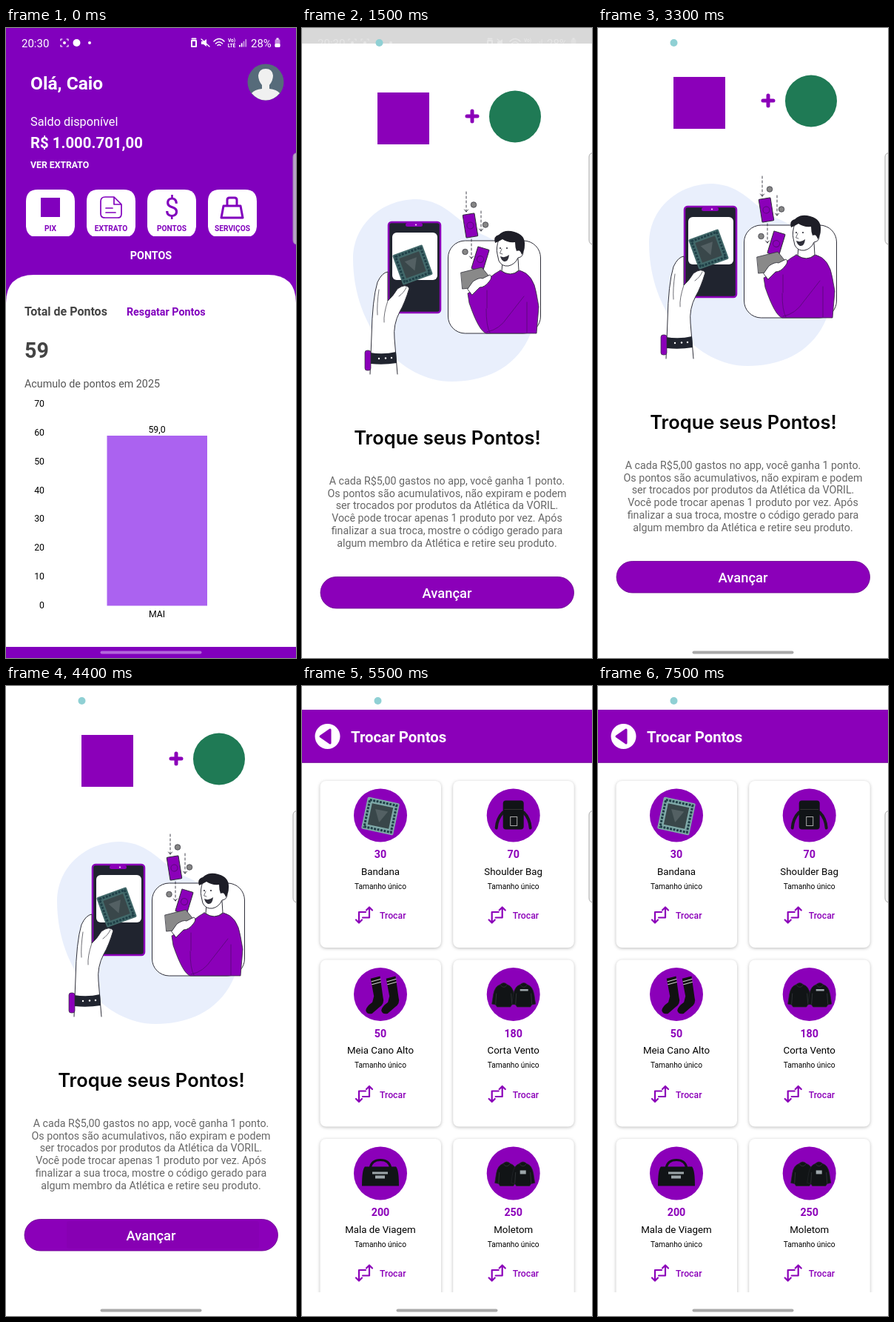
Animation, 392 px wide and 850 px high, one loop 8000 ms. Source, as an HTML page:

```html
<!DOCTYPE html>
<html lang="pt-BR">
<head>
<meta charset="utf-8">
<title>Pontos</title>
<style>
  html, body { margin: 0; width: 100%; height: 100%; overflow: hidden; background: #fff; }
  svg { display: block; width: 100%; height: 100%; }
  text { font-family: Roboto, sans-serif; }
  .card { filter: drop-shadow(0 1.5px 2px #0004); }
</style>
</head>
<body>
<svg id="stage" viewBox="0 0 392 850" xmlns="http://www.w3.org/2000/svg"></svg>
<script>
const LOOP = 8000;
const HOME = '#8100bd', PURPLE = '#8b00b9', INK = '#30303a';

const text = (x, y, size, str, { weight = 400, fill = '#000', anchor = 'start', font = '' } = {}) =>
  `<text x="${x}" y="${y}" font-size="${size}" font-weight="${weight}" fill="${fill}" text-anchor="${anchor}"${
    font ? ` style="font-family:${font}"` : ''}>${str}</text>`;
const rect = (x, y, w, h, r, fill, extra = '') =>
  `<rect x="${x}" y="${y}" width="${w}" height="${h}" rx="${r}" fill="${fill}" ${extra}/>`;
const circle = (x, y, r, fill, extra = '') => `<circle cx="${x}" cy="${y}" r="${r}" fill="${fill}" ${extra}/>`;
const path = (d, fill = 'none', stroke = 'none', width = 1, extra = '') =>
  `<path d="${d}" fill="${fill}" stroke="${stroke}" stroke-width="${width}" stroke-linecap="round" stroke-linejoin="round" ${extra}/>`;
const group = (id, body, extra = '') => `<g id="${id}" ${extra}>${body}</g>`;
const at = (x, y, body, turn = 0) => `<g transform="translate(${x} ${y}) rotate(${turn})">${body}</g>`;

function home() {
  const white = { fill: '#fff', weight: 700 };
  const dark = { fill: '#444', weight: 700 };
  const icons = [
    rect(47, 229, 26, 26, 0, HOME),
    path('M134 228H146L156 238V251Q156 256 151 256H134Q128 256 128 251V234Q128 228 134 228M146 229V238H155M135 243H144M135 249H148', 'none', HOME, 1.7),
    text(224, 254, 35, '$', { fill: HOME, anchor: 'middle' }),
    path('M299 239V232Q299 229 302 229H309Q312 229 312 232V239M294 240H317L320 256H291Z', 'none', HOME, 3),
  ];
  const tiles = ['PIX', 'EXTRATO', 'PONTOS', 'SERVIÇOS'].map((label, i) => {
    const x = 27 + 82 * i;
    return path(`M${x} 234Q${x} 218 ${x + 16} 218H${x + 50}Q${x + 66} 218 ${x + 66} 234V268Q${x + 65} 278 ${x + 58} 281H${x + 8}Q${x + 1} 278 ${x} 268Z`, '#fff')
      + icons[i] + text(x + 33, 273.5, 10.2, label, { weight: 700, fill: HOME, anchor: 'middle' });
  }).join('');
  const axis = Array.from({ length: 8 }, (_, i) =>
    text(52, 783 - i * 38.85, 12.25, i * 10, { anchor: 'end' })).join('');
  return rect(0, 0, 392, 850, 0, HOME)
    + text(33, 83, 24.5, 'Olá, Caio', white)
    + circle(351, 73, 24.5, '#566b7a')
    + path('M332 88Q336 83 346 82V77Q341 71 341 64Q342 55 351 55Q360 55 361 64Q361 71 356 77V82Q366 83 370 88Q362 97.5 351 97.5Q340 97.5 332 88Z', '#f0f0f0')
    + text(33, 132, 16.3, 'Saldo disponível', { fill: '#fff' })
    + text(33, 162, 20.4, 'R$ 1.000.701,00', white)
    + text(33, 189, 12.25, 'VER EXTRATO', white)
    + tiles
    + text(196, 312, 14.3, 'PONTOS', { ...white, anchor: 'middle' })
    + path('M0 835V371Q0 333 38 333H354Q392 333 392 371V835Z', '#fff')
    + text(25, 388, 16, 'Total de Pontos', dark)
    + text(163, 388, 14.3, 'Resgatar Pontos', { weight: 700, fill: HOME })
    + text(25, 445, 28.6, '59', dark)
    + text(25, 485, 14.3, 'Acumulo de pontos em 2025', { fill: '#555' })
    + axis
    + rect(136.5, 550, 135.5, 229.5, 0, '#ab62f0')
    + text(204, 546, 12.25, '59,0', { anchor: 'middle' })
    + text(204, 795, 12.25, 'MAI', { anchor: 'middle' });
}

const bandana = (size, hem) =>
  rect(-size / 2, -size / 2, size, size, 2, hem)
  + rect(-size * .42, -size * .42, size * .84, size * .84, 0, 'none', `stroke="#1f3f47" stroke-width="${size * .07}" stroke-dasharray="3 1.5"`)
  + rect(-size * .33, -size * .33, size * .66, size * .66, 0, '#39474a')
  + path(`M${-size * .2} ${-size * .18}H${size * .2}L0 ${size * .2}Z`, '#536063');

function illustration() {
  const bill = (x, y, turn) => at(x, y, rect(-8, -15.5, 16, 31, 1, PURPLE, `stroke="${INK}"`)
    + circle(0, 0, 4.5, 'none', 'stroke="#5c087c"'), turn);
  const arrow = (x, y, length) => path(`M${x} ${y}v${length}`, 'none', INK, .9, 'stroke-dasharray="3 3"')
    + path(`M${x - 2.5} ${y + length - 3}l2.5 3l2.5 -3`, 'none', INK, .9);
  const coin = (x, y) => circle(x, y, 3.8, '#858585', `stroke="${INK}" stroke-width=".7"`);
  return path('M69 290C69 245 107 210 155 210C195 212 209 240 240 256C280 273 316 300 317 345C318 405 280 456 202 456C135 456 69 385 69 290Z', '#e9effc')
    // phone and hand
    + rect(117, 241, 70, 122, 4, '#20242f', `stroke="${PURPLE}" stroke-width="2.5"`)
    + rect(140, 242, 23, 5, 2.5, PURPLE) + circle(154, 244.5, 1, '#fff')
    + rect(122, 255, 61, 64, 6, '#fff')
    + at(149.5, 298.5, bandana(43, '#42696a'), -20)
    + path('M92 446L94 395Q95 345 102 322Q108 309 116 308V347Q123 341 129 331Q140 323 145 330Q139 350 132 362Q123 379 125 398L129 446', '#fff', INK, 1)
    + path('M116 347Q110 365 111 376M131 341Q138 336 141 329M104 332Q101 352 102 366', 'none', INK, .7)
    + path('M92 417Q110 420 127 416L128 431Q110 434 93 432Z', '#20242f')
    + circle(104, 425, 1.2, '#fff') + circle(113, 424.5, 1.2, '#fff') + circle(121, 424, 1.2, '#fff')
    + rect(85, 414, 8, 27, 3, PURPLE, `stroke="${INK}" stroke-width=".7"`)
    // man with wallet
    + rect(197.5, 266, 125, 125, 23, '#fff', `stroke="${INK}"`)
    + path('M271 294L270 307Q282 316 293 306L292 290Z', '#fff', INK)
    + path('M266 264Q262 276 264 284L266 293Q270 301 279 300Q288 298 292 289Q299 288 299 281Q297 276 292 279V263Z', '#fff', INK)
    + path('M261 269Q258 260 266 258Q274 250 287 254Q302 258 301 272Q301 280 297 285Q295 277 290 280Q288 275 288 268Q278 269 271 264Q266 267 261 269Z', '#1e1e27')
    + circle(268, 276, 1.1, INK) + circle(277, 276, 1.1, INK) + path('M270 277L267.5 283L271 284', 'none', INK, .7)
    + path('M268 287Q274 290 280 285Q279 295 273 294Q269 292 268 287Z', INK)
    + path('M268 306Q282 316 294 306Q313 311 317 338L320 355L317 391H249Q239 388 226 350L224 337L244 327Q253 314 268 306Z', PURPLE, INK, .8)
    + path('M250 333V357M250 389Q267 386 278 369L300 341M249 358Q249 382 254 390M304 349V390', 'none', '#5c087c', .9)
    + bill(241, 291, 17)
    + path('M215 309L243 302L252 313L245 328L217 331Z', '#898989', INK, .8)
    + path('M224 331L231 321Q240 315 244 317L254 312Q258 315 253 321Q247 329 240 329L230 339Z', '#fff', INK, .9)
    + bill(227.5, 245.5, -9)
    + arrow(222, 200, 27) + arrow(242, 226, 27) + arrow(229, 264, 26)
    + coin(232, 217.5) + coin(248, 244.5) + coin(220.5, 281);
}

function intro() {
  const lines = [
    'A cada R$5,00 gastos no app, você ganha 1 ponto.',
    'Os pontos são acumulativos, não expiram e podem',
    'ser trocados por produtos da Atlética da VORIL.',
    'Você pode trocar apenas 1 produto por vez. Após',
    'finalizar a sua troca, mostre o código gerado para',
    'algum membro da Atlética e retire seu produto.',
  ];
  return rect(0, 0, 392, 850, 0, '#fff')
    + rect(102, 66, 70, 70, 0, PURPLE)
    + path('M223 98H237M230 91V105', 'none', PURPLE, 5)
    + circle(288, 98.5, 35, '#1f7a55')
    + illustration()
    + text(196.5, 540.5, 25.5, 'Troque seus Pontos!', { weight: 600, anchor: 'middle', font: 'Inter, sans-serif' })
    + lines.map((line, i) => text(196, 595 + i * 16.7, 14.24, line, { fill: '#666', anchor: 'middle' })).join('')
    + rect(25, 719.5, 342.5, 42.5, 21.25, PURPLE, 'stroke="#69008e" stroke-width=".8"')
    + rect(82, 722, 260, 37, 3, '#000', 'id="press" opacity="0"')
    + text(196, 748, 18.4, 'Avançar', { weight: 500, fill: '#fff', anchor: 'middle' });
}

const jacket = x => at(x, 0,
  path('M-5 -13Q0 -18 5 -13Q12 -11 14 0L16 13L11 14L9 17H-9L-11 14L-16 13L-14 0Q-12 -11 -5 -13Z', '#111416', '#25292c', .7)
  + path('M-4 -12Q0 -7 4 -12M-10 -1L-11 13M10 -1L11 13', 'none', '#34393c', .8));
const label = (x, y, w, h) => rect(x, y, w, h, 0, '#9da6aa');
const sock = x => at(x, 0,
  path('M-7 -22L6 -24L7 4Q9 14 0 18L-10 25Q-17 26 -18 20Q-17 15 -8 10L-5 2Z', '#111')
  + path('M-6 -18L6 -20M-6 -14L6 -16', 'none', '#ccc', 1.2), -6);

const products = [
  [30, 'Bandana', at(0, 1, bandana(44, '#7fa9a8'), 12)],
  [70, 'Shoulder Bag', path('M-14 -4Q-22 4 -23 17M14 -4Q22 4 23 17', 'none', '#17191c', 4)
    + rect(-14, -20, 28, 39, 4, '#111417') + path('M-12 -8H12', 'none', '#333', 1) + rect(-4, 2, 9, 12, 0, 'none', 'stroke="#aaa"')],
  [50, 'Meia Cano Alto', sock(-4) + sock(17)],
  [180, 'Corta Vento', jacket(-13) + jacket(14) + label(9, -7, 11, 2.5)],
  [200, 'Mala de Viagem', path('M-14 -7Q-12 -18 0 -18Q12 -18 14 -7', 'none', '#111417', 3)
    + path('M-21 -9H21Q25 -5 25 17H-25Q-25 -5 -21 -9Z', '#111417') + label(-11, -2, 21, 3) + label(-7, 3, 13, 4)],
  [250, 'Moletom', jacket(-9) + jacket(13) + label(9, -4, 8, 5)],
];

function card([points, name, picture], i) {
  const opts = { anchor: 'middle' };
  return at(24.5 + (i % 2) * 179.7, 128 + Math.floor(i / 2) * 241.5,
    rect(0, 0, 163.5, 225, 8, '#fff', 'class="card"')
    + `<g class="picture">${circle(81.5, 46.5, 36, PURPLE)}${at(81.5, 46.5, picture)}</g>`
    + text(81.5, 104, 14.3, points, { ...opts, weight: 700, fill: PURPLE })
    + text(81.5, 126.5, 13.3, name, opts)
    + text(81.5, 145.5, 10.2, 'Tamanho único', opts)
    + path('M61.5 177H52.5V191M48.5 187.5L52.5 191.5L56.5 187.5M57.5 184.5H66.5V171M62.5 174.5L66.5 170.5L70.5 174.5', 'none', PURPLE, 2.2)
    + text(80.5, 186, 12.25, 'Trocar', { weight: 500, fill: PURPLE }));
}

function shop() {
  return rect(0, 0, 392, 850, 0, '#fff')
    + rect(0, 32, 392, 71.5, 0, PURPLE) + rect(0, 102.8, 392, .8, 0, '#69008e')
    + circle(34.5, 68, 17, '#fff') + path('M25 68L38 59V77Z', PURPLE, PURPLE, 3)
    + text(66, 76, 20.4, 'Trocar Pontos', { weight: 700, fill: '#fff' })
    + group('cards', products.map(card).join(''), 'clip-path="url(#list)"');
}

function statusBar() {
  const scan = (id, x) => group(id, path(`M${x - 5} 17v-2h2M${x + 3} 15h2v2M${x + 5} 23v2h-2M${x - 3} 25h-2v-2`, 'none', '#fff', 1.2)
    + circle(x, 20, 2, '#fff', 'class="dot"'));
  return text(21, 25.5, 15, '<tspan id="clock"></tspan>', { fill: '#fff' })
    + scan('scanA', 0) + scan('scanB', 85) + circle(0, 20, 2, '#fff', 'id="more"')
    + path('M251.5 14.5H256.5M251 17H257V25H251Z', 'none', '#fff', 2)
    + path('M264 18H267L271 15V25L267 22H264Z', '#fff') + path('M264 15L275 25', 'none', '#fff', 1.3)
    + path('M281 18Q288 11 295 18M283.5 21Q288 16.5 292.5 21M286 23.5Q288 21.5 290 23.5', 'none', '#fff', 1.5)
    + text(305, 19, 6.5, 'Vo)', { fill: '#fff', anchor: 'middle', weight: 700 })
    + text(305, 26, 6.5, 'LTE', { fill: '#fff', anchor: 'middle', weight: 700 })
    + [0, 1, 2, 3].map(i => rect(315 + i * 2.8, 23 - i * 2.6, 1.7, 2.5 + i * 2.6, 0, '#fff', i > 1 ? 'opacity=".6"' : '')).join('')
    + text(331, 25.5, 15, '28%', { fill: '#fff' })
    + rect(363.5, 15, 7, 11, 2, '#fff', 'opacity=".55"') + rect(363.5, 21, 7, 5, 1.5, '#fff') + rect(365.5, 13.5, 3, 2, 0, '#fff');
}

const stage = document.getElementById('stage');
const strip = rect(0, 0, 392, 60, 0, '#d8d8d8');
stage.innerHTML = '<clipPath id="list"><rect y="104" width="392" height="714"/></clipPath>'
  + group('home', home())
  + group('intro', strip + group('introBody', intro()))
  + group('shop', strip + group('shopBody', shop()))
  + group('status', statusBar())
  + circle(0, 20, 5, '#fff', 'id="notice"')
  + path('M393 168.5Q388 169 388 174V286Q388 291.5 393 292', '#f4f4f4', '#aaa', 1, 'id="handle"')
  + rect(127.5, 840.5, 137, 4, 2, '#a9a9a9', 'id="pill"');

const el = id => document.getElementById(id);
const set = (id, attrs) => { for (const k in attrs) el(id).setAttribute(k, attrs[k]); };
const ramp = (t, from, to) => Math.min(1, Math.max(0, (t - from) / (to - from)));
const slide = (t, from, to) => Math.round(32 * (1 - ramp(t, from, to)) ** 1.5);

function draw(t) {
  const onHome = t < 1400, inShop = t >= 4550;
  const introTop = slide(t, 1400, 1800), shopTop = slide(t, 4720, 5000);
  set('intro', { opacity: ramp(t, 1350, 1450) });
  set('introBody', { transform: `translate(0 ${introTop})` });
  set('press', { opacity: t >= 4400 ? .03 : 0 });
  set('shop', { opacity: ramp(t, 4450, 4600) });
  set('shopBody', { transform: `translate(0 ${shopTop})` });
  set('cards', { opacity: t >= 5200 ? 1 : 0 });
  for (const p of document.querySelectorAll('.picture')) p.setAttribute('opacity', t >= 5300 ? 1 : 0);

  set('status', { opacity: onHome ? 1 : inShop ? shopTop / 32 : introTop / 64 });
  el('clock').textContent = t < 3300 ? '20:30' : '20:31';
  set('scanA', { transform: `translate(${onHome ? 79 : 68} 0)` });
  set('scanB', { opacity: onHome ? 0 : 1 });
  el('scanA').querySelector('.dot').setAttribute('r', t >= 400 && t < 1000 ? 1.5 : 2);
  set('more', { cx: onHome ? 113 : 120 });
  set('notice', { cx: onHome ? 95.5 : t < 3300 ? 104.5 : 102.5, fill: onHome ? '#fff' : '#8fd0d4' });
  set('handle', { fill: onHome ? '#b9a3c8' : '#f4f4f4', stroke: onHome ? '#9a7fb0' : '#aaa' });
  set('pill', { fill: onHome ? '#b366dc' : '#a9a9a9', opacity: t >= 1400 && t < 1600 ? 0 : 1 });
}

function frame() {
  draw(performance.now() % LOOP);
  requestAnimationFrame(frame);
}
frame();
</script>
</body>
</html>
```
